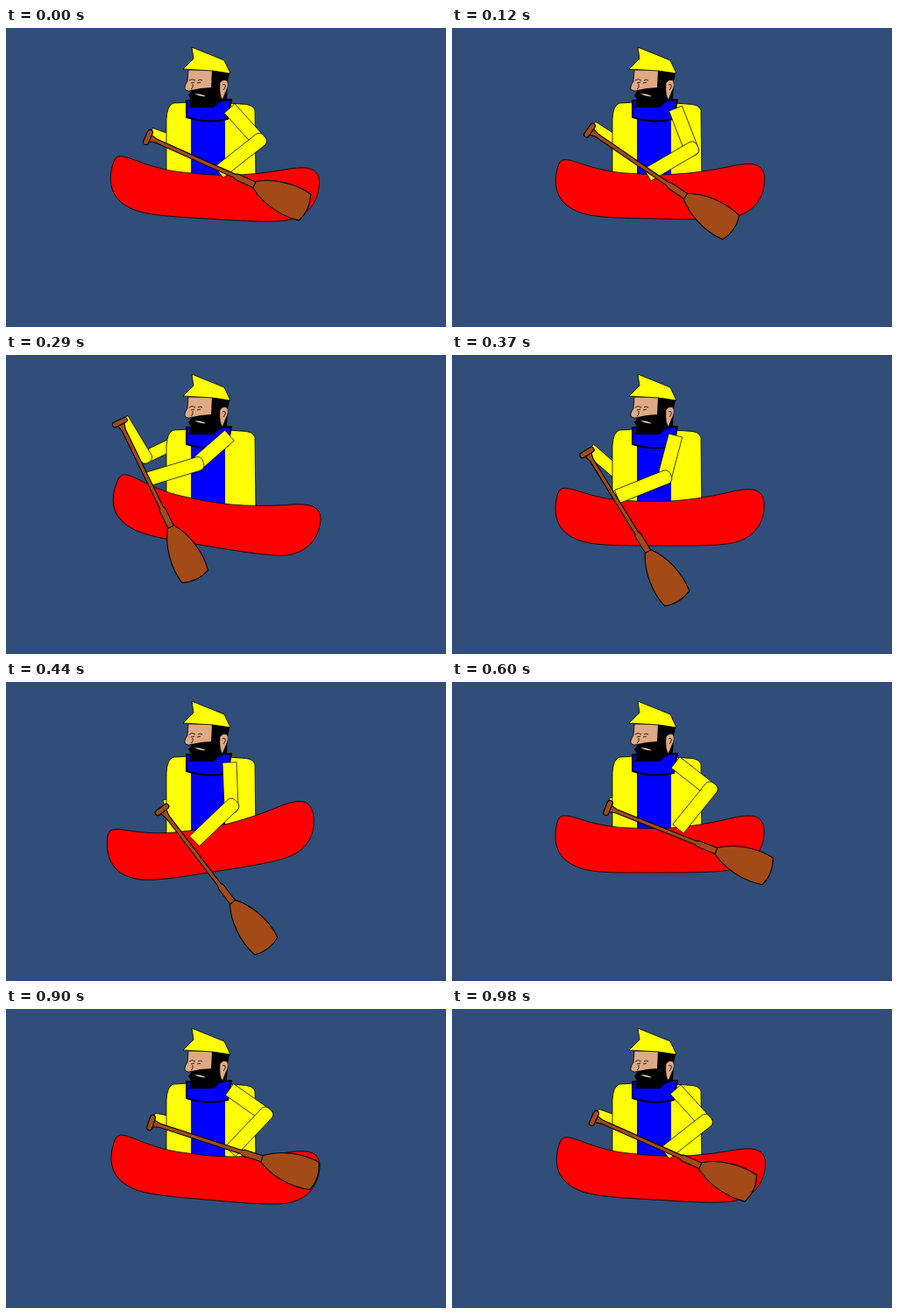
An HTML page with a canvas that plays this animation: 502 by 342 pixels, repeating every 1.06 s.

```html
<!DOCTYPE html>
<html lang="en">
<head>
<meta charset="utf-8">
<title>Paddling fisherman</title>
<style>
html, body { margin: 0; width: 100%; height: 100%; overflow: hidden; background: #304e79; }
canvas { display: block; }
</style>
</head>
<body>
<canvas id="stage" width="502" height="342"></canvas>
<script>
const ctx = document.getElementById('stage').getContext('2d');
const LOOP = 1060, STEP = 230 / 3, LAST = 13;
const YELLOW = '#ff0', BLUE = '#00f', BROWN = '#a34b18', SKIN = '#dfa985';

// Stroke key poses: boat tilt, paddle x, y, angle, near hand x, y
const keys = [
  [3.6, 162, 125, 24.1, 243, 165],
  [1.3, 157, 117, 34.6, 223, 168],
  [9.5, 130, 77, 64.1, 162, 142],
  [-8.8, 178, 146, 52.7, 215, 182],
  [0, 178, 144, 21.7, 258, 168],
  [8, 173, 140, 6.1, 282, 159]
];

const hull = new Path2D(`M127 153 C140 152 160 166 205 167 C250 170 290 163 322 155
  C342 151 354 152 356 168 C357 190 346 208 322 214 C305 218 270 218 235 218
  C200 218 170 219 150 214 C126 207 117 193 118 173 C119 162 121 153 127 153 Z`);
const jacket = new Path2D('M183 180 L183 104 Q184 88 191 86 L225 84 L268 87 Q282 87 284 94 L285 180 Z');
const collar = new Path2D('M206 83 L206 102 Q230 110 253 104 L257 82 Z');
const hat = new Path2D('M212 22 L249 37 L256 52 L236 49 L202 47 L214 35 Z');
const face = new Path2D('M208 48 L207 61 Q202 68 205 71 Q208 73 213 71 L218 78 L240 76 L238 48 Z');
const hair = new Path2D('M235 48 L255 52 L253 62 L252 82 L242 86 L237 91 L208 91 L211 82 L208 77 L212 71 L222 69 L234 68 Z');
const ear = new Path2D('M244 63 Q247 58 252 60 Q255 65 251 72 L247 82 Q243 78 244 63 Z');
const features = new Path2D('M209 60 Q212 57 216 60 M219 60 Q221 58 224 60 M211 63 L215 62 M218 63 L222 62 M213 64 Q214 69 211 70 M247 65 Q251 63 250 68 L248 71');
const mouth = new Path2D('M215 75 Q222 75 228 78 Q221 79 215 75 Z');
const blade = new Path2D('M133 -4 C149 -15 174 -21 196 -16.5 Q203 0 196 16.5 C174 21 149 15 133 4 Z');
const shaft = new Path2D('M3 -4 L10 -2.2 L108 -2.2 L111 -3.6 L134 -3.6 L134 3.6 L111 3.6 L108 2.2 L10 2.2 L3 4 Z');
const grip = new Path2D();
grip.roundRect(-3, -9, 6, 18, 3);

function paint(path, fill, width = 0.8) {
  ctx.fillStyle = fill;
  ctx.fill(path);
  if (!width) return;
  ctx.strokeStyle = '#000';
  ctx.lineWidth = width;
  ctx.stroke(path);
}

function placed(x, y, angle, draw) {
  ctx.save();
  ctx.translate(x, y);
  ctx.rotate(angle);
  draw();
  ctx.restore();
}

// Sleeve with a square end at a and a rounded elbow at b
function sleeve(ax, ay, bx, by, width) {
  const r = width / 2, path = new Path2D();
  path.roundRect(0, -r, Math.hypot(bx - ax, by - ay) + r, width, [0, 6, 6, 0]);
  placed(ax, ay, Math.atan2(by - ay, bx - ax), () => paint(path, YELLOW, 0.7));
}

// Two-bone arm: the elbow follows from shoulder, hand and bone lengths
function arm(sx, sy, hx, hy, upper, fore, width) {
  const d = Math.hypot(hx - sx, hy - sy);
  const ux = (hx - sx) / d, uy = (hy - sy) / d;
  const along = (upper ** 2 - fore ** 2 + d ** 2) / (2 * d);
  const out = Math.sqrt(Math.max(0, upper ** 2 - along ** 2));
  const ex = sx + ux * along + uy * out, ey = sy + uy * along - ux * out;
  sleeve(sx, sy, ex, ey, width);
  sleeve(hx, hy, ex, ey, width);
}

function poseAt(step) {
  // The recovery back to the first key takes three steps, every other move two
  const p = step < 10 ? step / 2 : 5 + (step - 10) / 3;
  const i = Math.floor(p), next = keys[(i + 1) % keys.length];
  return keys[i % keys.length].map((v, n) => v + (next[n] - v) * (p - i));
}

function drawBody() {
  paint(jacket, YELLOW);
  ctx.fillStyle = BLUE;
  ctx.fillRect(211, 100, 39, 80);
  paint(collar, BLUE, 2);
  paint(face, SKIN);
  paint(hair, '#000', 0);
  paint(ear, SKIN, 0.6);
  ctx.lineWidth = 0.8;
  ctx.stroke(features);
  paint(mouth, '#f4d8c6', 0);
  paint(hat, YELLOW);
}

function draw(step) {
  const [tilt, px, py, angle, hx, hy] = poseAt(step);
  const rad = Math.PI / 180;
  ctx.fillStyle = '#304e79';
  ctx.fillRect(0, 0, 502, 342);
  arm(198, 98, px + 3, py - 4, 43, 51, 14);
  drawBody();
  placed(229, 197, tilt * rad, () => {
    ctx.translate(-229, -197);
    paint(hull, '#f00');
  });
  arm(255, 92, hx, hy, 50, 58, 16);
  placed(px, py, angle * rad, () => {
    paint(shaft, BROWN, 1.1);
    paint(grip, BROWN, 1.1);
    paint(blade, BROWN, 1.1);
  });
}

// The first two steps are shorter than the rest
function stepAt(t) {
  if (t < 120) return Math.floor(t / 70);
  return Math.min(LAST, Math.max(2, Math.floor((t + 20) / STEP)));
}

function tick(now) {
  draw(stepAt(now % LOOP));
  requestAnimationFrame(tick);
}
requestAnimationFrame(tick);
</script>
</body>
</html>
```
